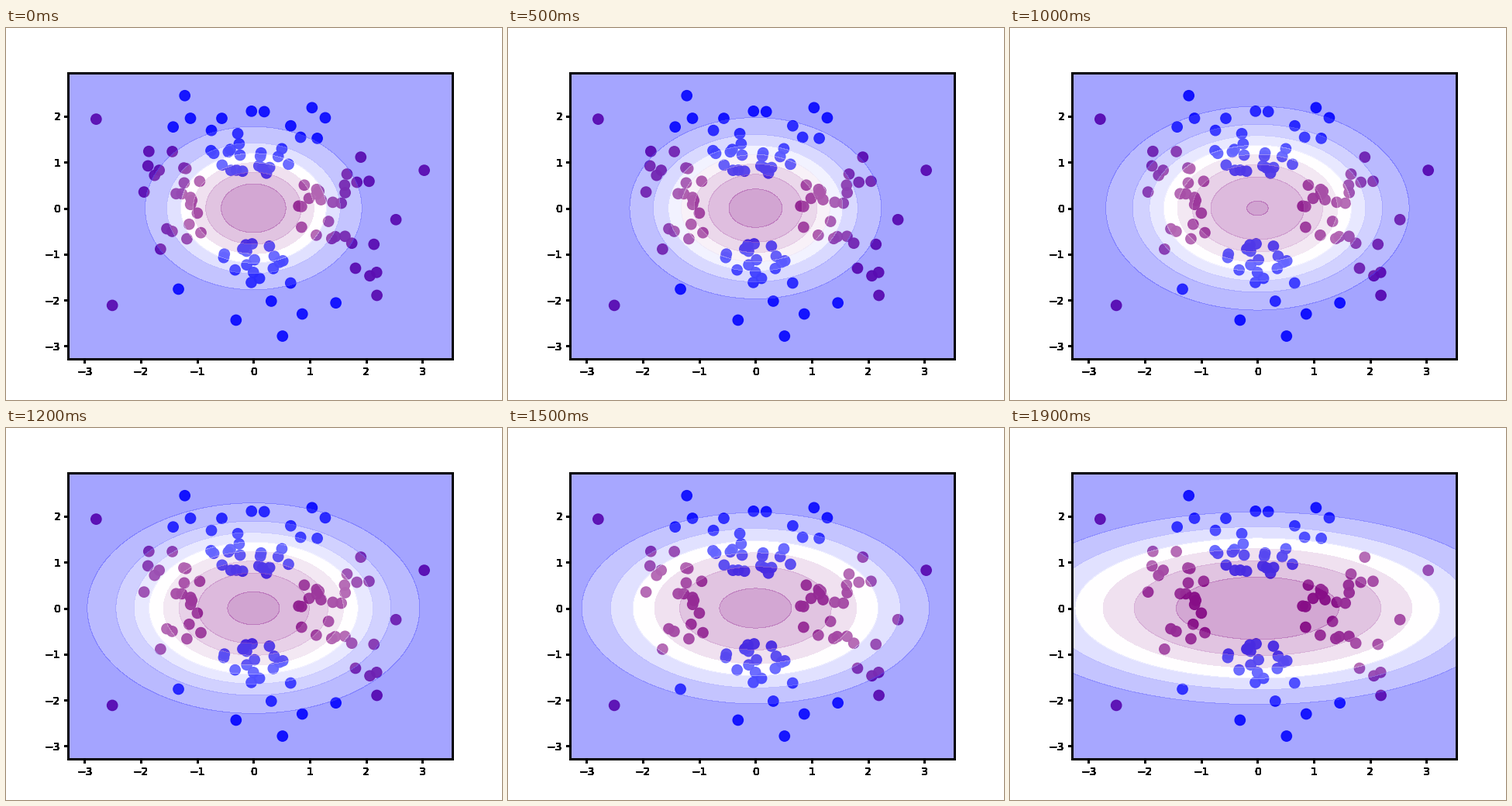
A matplotlib script that plays this animation: 640x480 px, repeating every 2000 ms.

```python
import numpy as np
import matplotlib.pyplot as plt
from matplotlib.animation import FuncAnimation
from matplotlib.colors import LinearSegmentedColormap

FRAMES, INTERVAL = 20, 100
SAMPLES, GAP, MARGIN = 200, 0.5, 0.5
SATURATION = 0.985

# Key points of the training run
KEYS = [0, 10, 14, 17, 19]
BIAS = [-0.017, 0.162, 0.230, 0.338, 0.364]
WEIGHT_Y = [0.486, 0.348, 0.3175, 0.3357, 0.341]

plt.rcParams.update({
    "font.family": "DejaVu Sans",
    "axes.linewidth": 2.1,
    "xtick.major.width": 2.1,
    "ytick.major.width": 2.1,
})
cmap = LinearSegmentedColormap.from_list("classes", ["blue", "white", "purple"])

# Two classes split by the diagonals, with a gap between them
points = np.random.RandomState(1).randn(SAMPLES, 2)
side = points[:, 0]**2 - points[:, 1]**2
keep = np.abs(side) > GAP
points, side = points[keep], side[keep]
x_low, y_low = points.min(axis=0) - MARGIN
x_high, y_high = points.max(axis=0) + MARGIN
grid_x, grid_y = np.meshgrid(np.linspace(x_low, x_high, 300),
                             np.linspace(y_low, y_high, 300))

fig = plt.figure(figsize=(6.4, 4.8), dpi=100)


def add_axes():
    axes = fig.add_axes([0.125, 0.11, 0.775, 0.77], facecolor="none")
    axes.set(xlim=(x_low, x_high), ylim=(y_low, y_high),
             xticks=range(-3, 4), yticks=range(-3, 3))
    return axes


ax = add_axes()
colors = np.where(side > 0, "purple", "blue")
ax.scatter(*points.T, s=92, c=colors, alpha=0.95, zorder=1)

# Stacked axes give the heavy labels
for _ in range(16):
    add_axes()

shown = []


def draw(i):
    while shown:
        shown.pop().remove()
    bias = np.interp(i, KEYS, BIAS)
    weight_x = 0.414 - 0.0178 * i
    weight_y = np.interp(i, KEYS, WEIGHT_Y)
    z = SATURATION * np.tanh(bias - weight_x * grid_x**2 - weight_y * grid_y**2)
    peak = SATURATION * np.tanh(bias)
    step = 0.15 if i < 15 else 0.2
    low, high = np.floor(-SATURATION / step), np.ceil(peak / step)
    levels = step * np.arange(low, high + 1)
    shown.append(ax.contourf(grid_x, grid_y, z, levels=levels, cmap=cmap,
                             alpha=0.4, zorder=1.5))
    return shown


anim = FuncAnimation(fig, draw, frames=FRAMES, interval=INTERVAL,
                     init_func=lambda: draw(0), repeat=True, repeat_delay=0)
plt.show()
```
